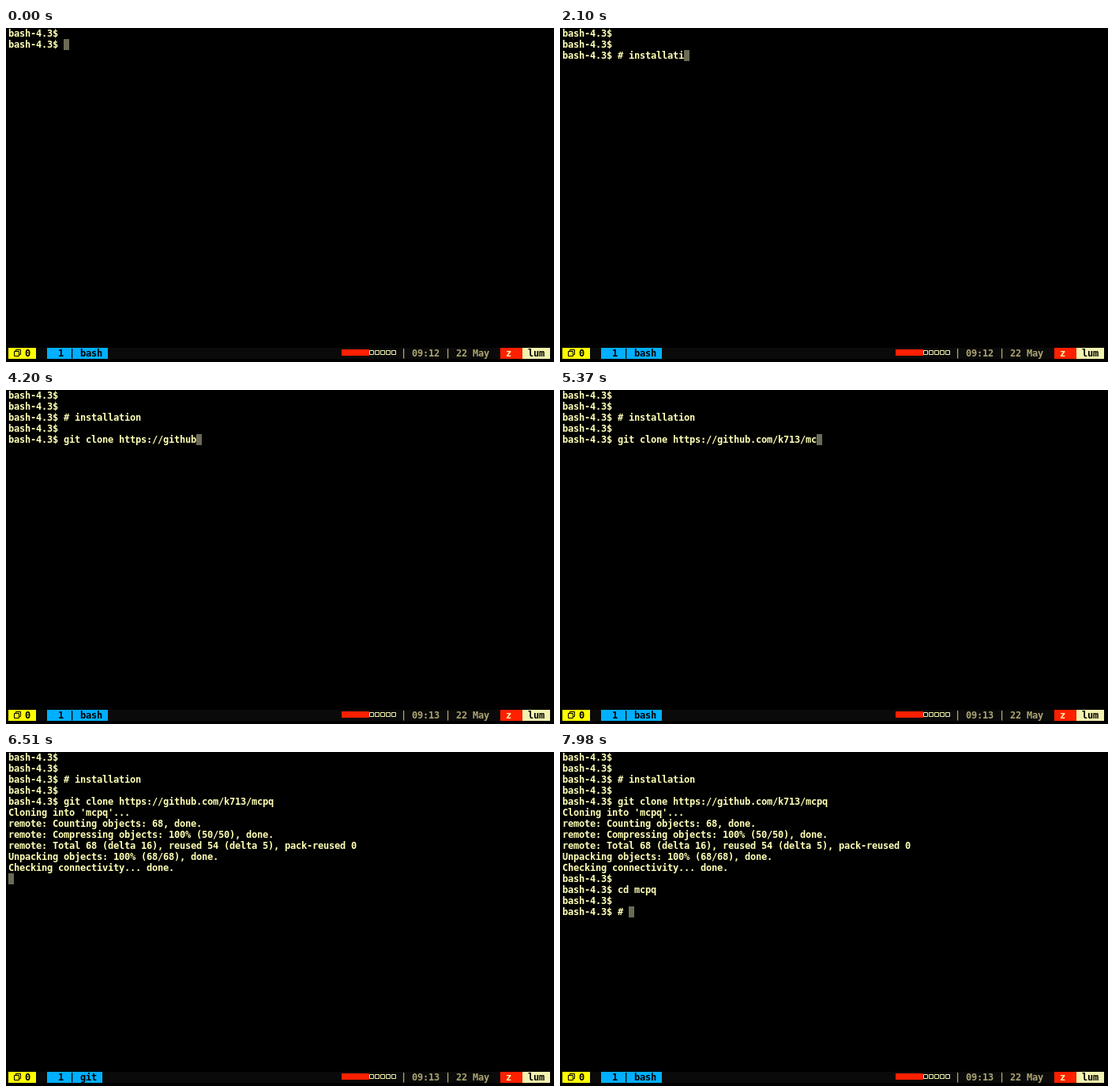
An HTML page for the animation above (8000 ms loop, 694 by 424 pixels).

```html
<!DOCTYPE html>
<html lang="en">
<head>
<meta charset="utf-8">
<title>Terminal session</title>
<style>
  html, body { margin: 0; width: 100%; height: 100%; overflow: hidden; background: #000; }
  #stage {
    position: relative; width: 694px; height: 424px; overflow: hidden;
    background: #000; color: #ffffb6;
    font: bold 12px/14px "DejaVu Sans Mono", "Liberation Mono", monospace;
    font-variant-ligatures: none;
  }
  #stage * { position: absolute; margin: 0; white-space: pre; font: inherit; }
  #screen { left: 3px; top: 0; }
  #cursor { width: 7px; height: 14px; background: #6b6a55; }
  #bar { left: 3px; top: 406px; width: 686px; height: 14px; background: #0a0a0a; }
  #bar > * { top: 0; height: 14px; color: #000; }
  #bar .dim { color: #aca472; }
  #session { left: 0; background: #ff0; }
  #window { left: 49px; background: #00afff; }
  #clock { left: 497px; }
  #user { left: 623px; background: #ff2000; }
  #bar #user { color: #ffffb6; }
  #host { left: 651px; background: #f3f3b0; }
  svg { left: 0; top: 0; }
</style>
</head>
<body>
<div id="stage">
  <div id="cursor"></div>
  <pre id="screen"></pre>
  <div id="bar">
    <div id="session">   0 </div>
    <div id="window"></div>
    <div id="clock" class="dim"></div>
    <div id="user"> z  </div>
    <div id="host"> lum </div>
    <svg id="marks" width="686" height="14" fill="none">
      <path d="M7.5 4.5h6v6h-6zM9.5 4v-1.5h6v6h-1.5" stroke="#000"/>
      <path d="M422 2h35v8h-35z" fill="#ff2000"/>
    </svg>
  </div>
</div>
<script>
const LOOP = 8000, CELL = 7, ROW = 14, LEFT = 3;
const PROMPT = "bash-4.3$ ";
const NEXT = "\n" + PROMPT;
const byId = id => document.getElementById(id);

// [start ms, ms per character (0 = all at once), text]
const script = [
  [0, 0, PROMPT + NEXT],
  [420, 0, NEXT],
  [780, 115, "# installation"],
  [2420, 0, NEXT],
  [2540, 0, NEXT],
  [2620, 69, "git clone "],
  [3310, 67, "https://github"],
  [4270, 97, ".com/k713/mcpq"],
  [5630, 0, "\n"],
  [5670, 0, "Cloning into 'mcpq'...\n"],
  [6120, 0, "remote: Counting objects: 68, done.\n"],
  [6210, 0, "remote: Compressing objects: 100% (50/50), done.\n"],
  [6360, 0, "remote: Total 68 (delta 16), reused 54 (delta 5), pack-reused 0\n"],
  [6420, 0, "Unpacking objects: 100% (68/68), done.\n"],
  [6480, 0, "Checking connectivity... done.\n"],
  [6540, 0, PROMPT],
  [6720, 0, NEXT],
  [6840, 80, "cd mcpq"],
  [7440, 0, NEXT],
  [7620, 0, NEXT],
  [7830, 105, "# "]
];

function shown(t, [start, step, text]) {
  if (t < start) return "";
  return step ? text.slice(0, Math.floor((t - start) / step) + 1) : text;
}

function setText(id, text) {
  const el = byId(id);
  if (el.textContent !== text) el.textContent = text;
}

function render(t) {
  const text = script.map(part => shown(t, part)).join("");
  const lines = text.split("\n");
  const row = lines.length - 1;
  setText("screen", text);
  byId("cursor").style.left = LEFT + lines[row].length * CELL + "px";
  byId("cursor").style.top = row * ROW + "px";
  setText("window", `  1 | ${t >= 5760 && t < 6750 ? "git" : "bash"} `);
  setText("clock", `| 09:${t < 3720 ? 12 : 13} | 22 May`);
}

// Keep the font on the seven-pixel terminal grid.
function fitGrid() {
  const probe = document.createElement("span");
  probe.textContent = "0".repeat(100);
  byId("stage").append(probe);
  const advance = probe.getBoundingClientRect().width / 100;
  probe.remove();
  byId("stage").style.letterSpacing = CELL - advance + "px";
}

function drawBattery() {
  const outline = document.createElementNS("http://www.w3.org/2000/svg", "path");
  const boxes = Array.from({ length: 5 }, (_, i) => `M${457.5 + i * CELL} 3.5h5v5h-5z`);
  outline.setAttribute("d", boxes.join(""));
  outline.setAttribute("stroke", "#f3f3b0");
  byId("marks").append(outline);
}

fitGrid();
drawBattery();
const begin = performance.now();
function tick() {
  render((performance.now() - begin) % LOOP);
  requestAnimationFrame(tick);
}
tick();
</script>
</body>
</html>
```
